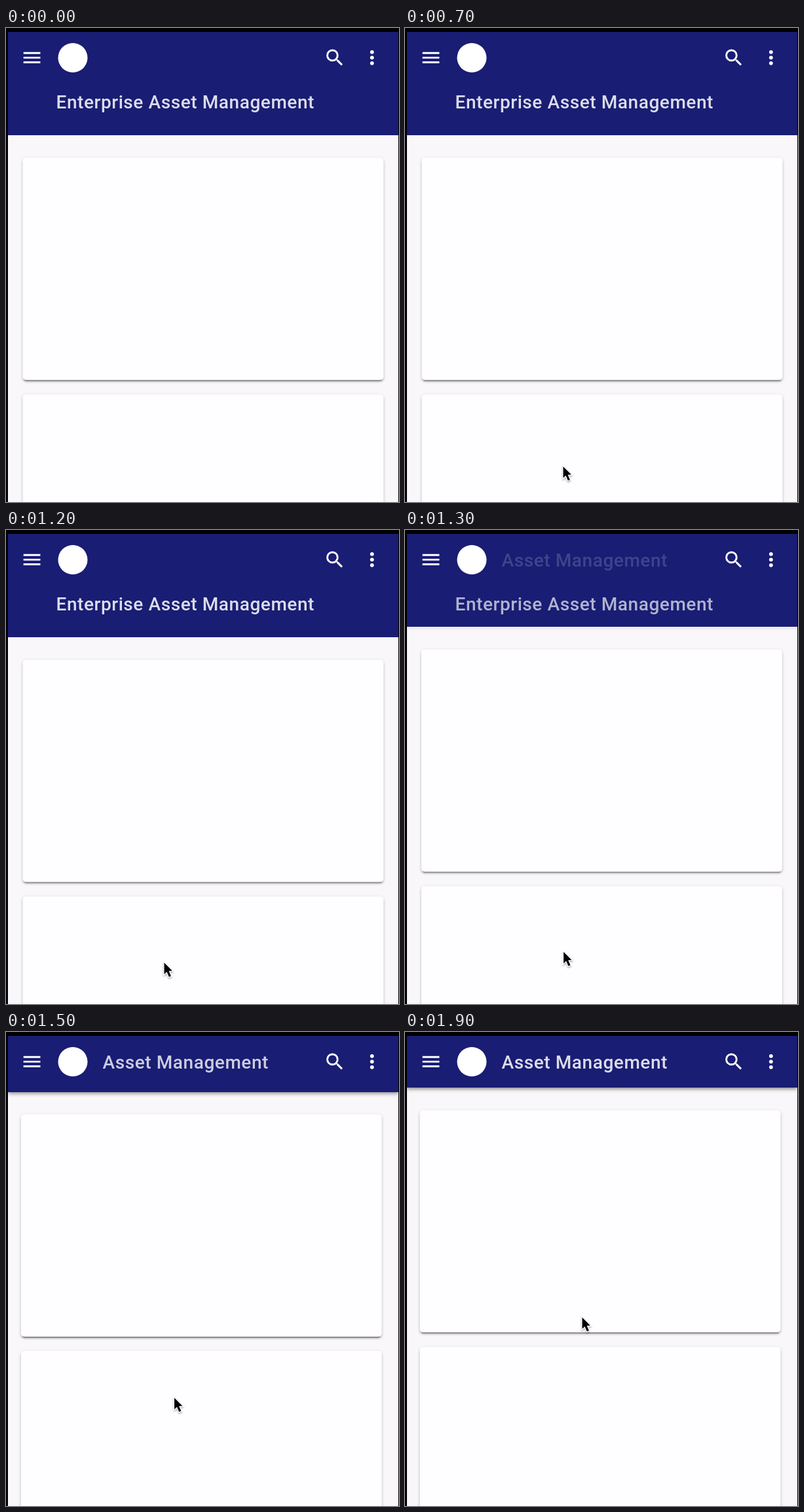
An HTML page that plays this animation: 600x725 px, repeating every 3.8 s.

```html
<!DOCTYPE html>
<html lang="en">
<head>
<meta charset="utf-8">
<title>Collapsing header</title>
<style>
  html, body { margin: 0; width: 100%; height: 100%; overflow: hidden; background: #000; }
  #page { position: absolute; left: 3px; top: 6px; width: 595.5px; height: 719px; overflow: hidden; background: #f9f7fa; }
  .card {
    position: absolute; left: 22px; width: 551px; height: 340px; border-radius: 5px; background: #fefdff;
    box-shadow: 0 2.8px 2.8px rgba(0,0,0,.16), 0 4.2px 1.4px -2.8px rgba(0,0,0,.4), 0 1.4px 5px rgba(0,0,0,.15);
  }
  #header { position: absolute; left: 0; top: 0; width: 596px; background: #191d73; }
  svg { position: absolute; left: 0; top: 0; }
  text { font: 500 28px Roboto, sans-serif; letter-spacing: .02em; fill: #fff; }
</style>
</head>
<body>
<div id="page">
  <div id="cards">
    <div class="card" style="top:192px"></div>
    <div class="card" style="top:554px"></div>
  </div>
  <div id="header"></div>
</div>
<svg width="600" height="725" viewBox="0 0 600 725">
  <defs>
    <clipPath id="clip"><rect id="clipBox" width="600"/></clipPath>
    <filter id="soft" x="-50%" y="-50%" width="200%" height="200%">
      <feDropShadow dx="0" dy="1.5" stdDeviation="1.3" flood-opacity=".4"/>
    </filter>
  </defs>
  <g fill="#fff">
    <path transform="translate(22.4 28.2) scale(1.43)" d="M3 18h18v-2H3zm0-5h18v-2H3zm0-7v2h18V6z"/>
    <circle cx="102" cy="45.5" r="22.5"/>
    <path transform="translate(484.8 28.3) scale(1.43)" d="M15.5 14h-.79l-.28-.27A6.47 6.47 0 0 0 16 9.5 6.5 6.5 0 1 0 9.5 16c1.61 0 3.09-.59 4.23-1.57l.27.28v.79l5 4.99L20.49 19zm-6 0a4.5 4.5 0 1 1 0-9 4.5 4.5 0 0 1 0 9z"/>
    <circle cx="558.8" cy="36.8" r="2.9"/>
    <circle cx="558.8" cy="45.3" r="2.9"/>
    <circle cx="558.8" cy="53.8" r="2.9"/>
  </g>
  <g clip-path="url(#clip)">
    <text id="large" x="76.5" y="123">Enterprise Asset Management</text>
  </g>
  <text id="small" x="147.5" y="55.5">Asset Management</text>
  <path id="cursor" d="M0 0V17.6L4 13.9 7.3 21.6 10.4 20.3 7.1 12.7 12.4 12.4Z"
        stroke="#fff" stroke-width="2.4" paint-order="stroke" filter="url(#soft)"/>
</svg>
<script>
  const LOOP = 3800, STEP = 100, TRAVEL = 79;
  const $ = id => document.getElementById(id);
  const phase = (t, from, length) => Math.min(1, Math.max(0, (t - from) / length));
  const smooth = u => u * u * (3 - 2 * u);

  // cubic-bezier(.4, 0, .2, 1)
  function ease(u) {
    let low = 0, high = 1;
    for (let i = 0; i < 20; i++) {
      const s = (low + high) / 2, r = 1 - s;
      if (1.2 * s * r * r + .6 * s * s * r + s * s * s < u) low = s;
      else high = s;
    }
    return smooth(low);
  }

  function draw(ms) {
    // The screen updates ten times a second
    const t = Math.floor(ms % LOOP / STEP) * STEP;

    const folded = ease(phase(t, 1190, 470));
    const scroll = TRAVEL * folded, bottom = 164 - scroll;
    $('header').style.height = bottom - 6 + 'px';
    $('header').style.boxShadow = `0 2px 6px rgba(0,0,0,${.5 * folded})`;
    $('cards').style.transform = `translate(${.5 - 3 * folded}px,${.5 - scroll}px)`;
    $('clipBox').setAttribute('height', bottom);
    $('large').setAttribute('opacity', .85 * Math.max(0, 1 - 1.1 * folded));
    $('small').setAttribute('opacity', .85 * folded);

    // The pointer enters slowly, then sweeps up and to the right
    const enter = phase(t, 300, 500) ** 1.5;
    const sweep = smooth(phase(t, 1190, 660));
    const x = 241.5 + 29 * smooth(Math.min(1, 1.15 * sweep));
    const y = 692.5 - 30.5 * enter - 225.5 * sweep;
    $('cursor').setAttribute('visibility', t < 300 ? 'hidden' : 'visible');
    $('cursor').setAttribute('transform', `translate(${x} ${y})`);
  }

  const start = performance.now();
  function tick() {
    draw(performance.now() - start);
    requestAnimationFrame(tick);
  }
  tick();
</script>
</body>
</html>
```
